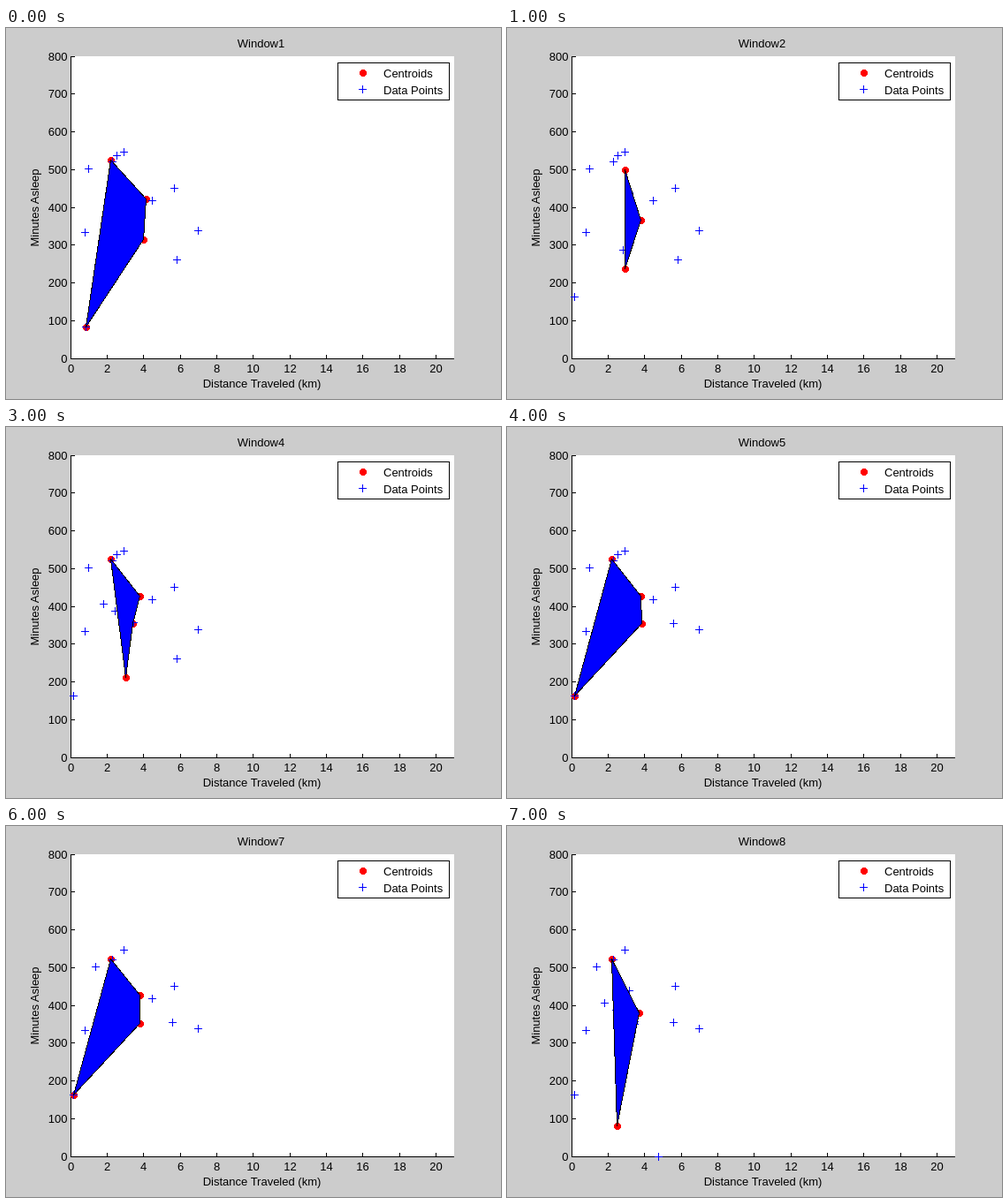
An HTML page for the animation above (8 s loop, 560 by 420 pixels).

```html
<!DOCTYPE html>
<html>
<head>
<meta charset="utf-8">
<style>
html, body { margin: 0; width: 100%; height: 100%; overflow: hidden; background: #ccc; }
svg { display: block; }
text { font: 13px "Liberation Sans", Arial, sans-serif; fill: #000; }
path, rect, circle { shape-rendering: crispEdges; }
.line { stroke: #000; fill: none; }
.plus { stroke: #00f; fill: none; }
.dot { fill: #f00; }
.hull { fill: #00f; stroke: #000; }
</style>
</head>
<body>
<svg width="560" height="420" viewBox="0 0 560 420">
  <rect width="560" height="420" fill="#ccc"/>
  <rect x="73" y="32" width="434" height="342" fill="#fff"/>
  <g id="axes"></g>
  <text id="title" x="288.5" y="22" text-anchor="middle"></text>
  <text x="289.5" y="407" text-anchor="middle">Distance Traveled (km)</text>
  <text transform="translate(37 203.5) rotate(-90)" text-anchor="middle">Minutes Asleep</text>
  <g id="dots"></g>
  <path id="marks" class="plus"/>
  <path id="hull" class="hull"/>
  <rect x="375.5" y="39.5" width="126" height="42" fill="#fff" stroke="#000"/>
  <g id="keys"></g>
  <text x="427" y="56">Centroids</text>
  <text x="427" y="75">Data Points</text>
</svg>
<script>
const STEP = 1000;
const el = id => document.getElementById(id);

// Data of the first window, in stage pixels
const first = [
  [93, 159], [120, 151], [125, 144], [133, 140], [138, 186], [140, 210], [165, 195],
  [190, 181], [89, 231], [217, 229], [193, 262], [131, 251], [90, 338], [144, 221]
];

// Each later window replaces one data point: [index, x, y]
const swaps = [
  [12, 76, 304], [11, 123, 208], [5, 110, 200], [10, 188, 222],
  [2, 144, 224], [0, 101, 159], [6, 171, 374]
];

// Clusters per window in hull order; each letter is a hex index into the data
const clusters = [
  '0123 4567 89abd c',
  '012347 5689d abc',
  '012347 5689bd ac',
  '0123 4567 89bd ac',
  '0123 4567 89abd c',
  '013 4567 289abd c',
  '013 4567 289abd c',
  '013 245789abd 6c'
];

const plus = ([x, y]) => `M${x - 4} ${y + .5}h9M${x + .5} ${y - 4}v9`;
const dot = ([x, y]) => `<circle class="dot" cx="${x + 1}" cy="${y + 1}" r="4"/>`;
const label = (x, y, anchor, value) =>
  `<text x="${x}" y="${y}" text-anchor="${anchor}">${value}</text>`;

function drawAxes() {
  let path = 'M73.5 32V375M73 374.5H507';
  let labels = '';
  for (let km = 0; km <= 20; km += 2) {
    const x = Math.round(72.9 + km * 433.6 / 21);
    path += `M${x + .5} 374v-4`;
    labels += label(x + .5, 390, 'middle', km);
  }
  for (let min = 0; min <= 800; min += 100) {
    const y = Math.floor(374 - min * 342 / 800);
    path += `M73 ${y + .5}h5`;
    labels += label(69.5, y + 5, 'end', min);
  }
  el('axes').innerHTML = `<path class="line" d="${path}"/>${labels}`;
}

function pointsAt(n) {
  const points = first.slice();
  for (const [i, x, y] of swaps.slice(0, n)) points[i] = [x, y];
  return points;
}

function centroid(group, points) {
  const members = [...group].map(c => points[parseInt(c, 16)]);
  const mean = axis => members.reduce((sum, p) => sum + p[axis], 0) / members.length;
  return [Math.round(mean(0)), Math.round(mean(1))];
}

let shown = -1;
function draw(time) {
  const n = Math.floor(time / STEP) % clusters.length;
  if (n === shown) return;
  shown = n;
  const points = pointsAt(n);
  const centres = clusters[n].split(' ').map(group => centroid(group, points));
  el('title').textContent = 'Window' + (n + 1);
  el('dots').innerHTML = centres.map(dot).join('');
  el('marks').setAttribute('d', points.map(plus).join(''));
  el('hull').setAttribute('d',
    'M' + centres.map(([x, y]) => `${x + .5} ${y + .5}`).join('L') + 'Z');
}

drawAxes();
el('keys').innerHTML = dot([403, 50]) + `<path class="plus" d="${plus([403, 69])}"/>`;
const start = performance.now();
function tick() {
  draw(performance.now() - start);
  requestAnimationFrame(tick);
}
tick();
</script>
</body>
</html>
```
